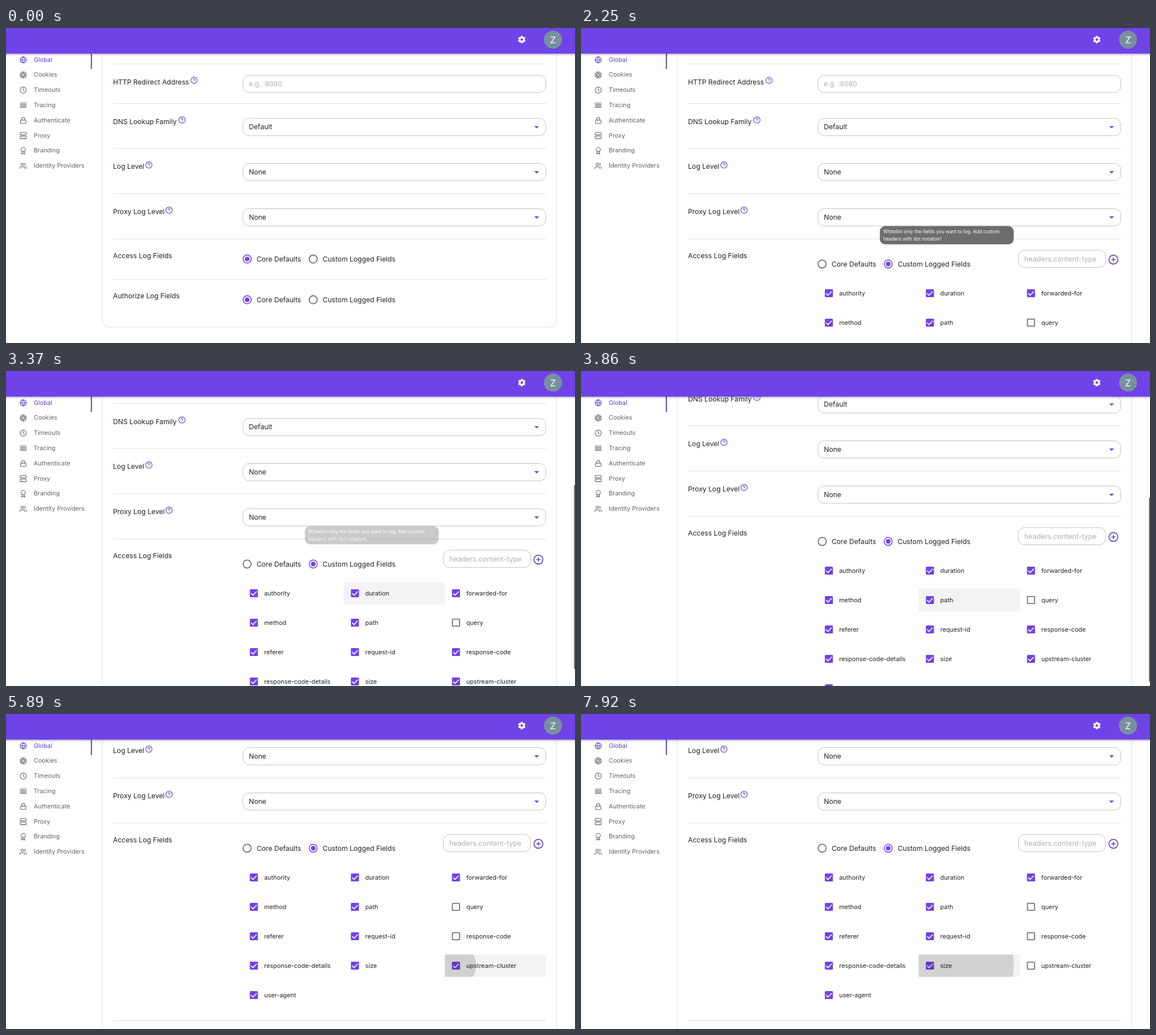
An HTML page for the animation above (7.99 s loop, 1005 by 557 pixels).

```html
<!DOCTYPE html>
<html lang="en">
<head>
<meta charset="utf-8">
<title>Log field settings</title>
<style>
  html, body { margin: 0; width: 100%; height: 100%; overflow: hidden; background: #fff; }
  svg { display: block; width: 100%; height: 100%; font-family: Inter, "Open Sans", sans-serif; }
</style>
</head>
<body>
<svg id="stage" viewBox="0 0 1005 557"></svg>
<script>
const LOOP = 7990, STEP = 70;
const PURPLE = '#6f43e7', INK = '#5e41c0', DARK = '#222', GREY = '#626262';
const stage = document.getElementById('stage');

function el(parent, tag, attrs = {}, content) {
  const node = document.createElementNS('http://www.w3.org/2000/svg', tag);
  for (const k in attrs) node.setAttribute(k, attrs[k]);
  if (content !== undefined) node.textContent = content;
  parent.appendChild(node);
  return node;
}
const group = (parent, attrs) => el(parent, 'g', attrs);
const show = (node, on) => node.setAttribute('visibility', on ? 'inherit' : 'hidden');
const fade = (node, v) => node.setAttribute('opacity', v);

// cy is the middle of the capital letters
function label(parent, x, cy, str, size = 12.15, fill = DARK, extra = {}) {
  return el(parent, 'text', { x, y: cy + size * 0.364, 'font-size': size, fill, ...extra }, str);
}
function box(parent, x, y, width, height, rx, attrs) {
  return el(parent, 'rect', { x, y, width, height, rx, ...attrs });
}

const ring = 'M2 12a10 10 0 1 0 20 0a10 10 0 1 0-20 0';
const icons = {
  globe: ring + 'M2 12h20M12 2a15.3 15.3 0 0 1 4 10 15.3 15.3 0 0 1-4 10 15.3 15.3 0 0 1-4-10 15.3 15.3 0 0 1 4-10z',
  aperture: ring + 'M14.3 8l5.7 9.9M9.7 8h11.5M7.4 12l5.7-9.9M9.7 16L4 6.1M14.3 16H2.8M16.6 12l-5.7 9.9',
  clock: ring + 'M12 6v6l4 2',
  lines: 'M2 5h20M2 9.7h20M2 14.3h20M2 19h20',
  lock: 'M5 11h14a2 2 0 0 1 2 2v7a2 2 0 0 1-2 2H5a2 2 0 0 1-2-2v-7a2 2 0 0 1 2-2zM7 11V7a5 5 0 0 1 10 0v4',
  server: 'M4 2h16a2 2 0 0 1 2 2v4a2 2 0 0 1-2 2H4a2 2 0 0 1-2-2V4a2 2 0 0 1 2-2z' +
    'M4 14h16a2 2 0 0 1 2 2v4a2 2 0 0 1-2 2H4a2 2 0 0 1-2-2v-4a2 2 0 0 1 2-2zM6 6h.01M6 18h.01',
  award: 'M5 8a7 7 0 1 0 14 0a7 7 0 1 0-14 0M8.2 13.9L7 23l5-3 5 3-1.2-9.1',
  users: 'M17 21v-2a4 4 0 0 0-4-4H5a4 4 0 0 0-4 4v2M5 7a4 4 0 1 0 8 0a4 4 0 1 0-8 0M23 21v-2a4 4 0 0 0-3-3.9M16 3.1a4 4 0 0 1 0 7.8',
  help: ring + 'M9.1 9a3 3 0 0 1 5.8 1c0 2-3 3-3 3M12 17h.01',
  plus: ring + 'M12 8v8M8 12h8'
};
function icon(parent, name, cx, cy, scale, stroke) {
  return el(parent, 'path', {
    d: icons[name], transform: `translate(${cx} ${cy}) scale(${scale}) translate(-12 -12)`,
    fill: 'none', stroke, 'stroke-width': 2, 'stroke-linecap': 'round', 'stroke-linejoin': 'round'
  });
}

const page = group(stage);

// settings card
const card = box(page, 170, -40, 802.5, 569, 13, { fill: '#fff', stroke: '#e0e0e0' });
const divider = (parent, y) => box(parent, 189, y - 0.5, 765, 1, 0, { fill: '#e0e0e0' });
[63.5, 133.5, 213, 293, 373].forEach(y => divider(page, y));

function field(x, y, width, parent = page) {
  box(parent, x + 0.5, y + 0.5, width - 1, 30.5, 11, { fill: '#fff', stroke: '#c2c2c2' });
}
function setting(name, cy, helpX, fieldY, value, isSelect = true) {
  label(page, 189, cy, name);
  icon(page, 'help', helpX, cy - 2.8, 0.56, INK);
  field(418, fieldY, 536);
  label(page, 429, fieldY + 15.6, value, 12.15, isSelect ? DARK : '#b0b0b0');
  if (isSelect) el(page, 'path', { d: `M933 ${fieldY + 14}h8.4l-4.2 4.2z`, fill: PURPLE });
}
setting('HTTP Redirect Address', 95.3, 332.2, 83, 'e.g. :8080', false);
setting('DNS Lookup Family', 165.5, 310.8, 159.4, 'Default');
setting('Log Level', 245, 252.4, 239, 'None');
setting('Proxy Log Level', 325, 288, 319, 'None');

function radio(parent, cx, cy, text) {
  const circle = el(parent, 'circle', { cx, cy, r: 7.1, fill: 'none', 'stroke-width': 1.6 });
  const dot = el(parent, 'circle', { cx, cy, fill: PURPLE });
  label(parent, cx + 16.7, cy, text);
  return amount => {
    circle.setAttribute('stroke', amount > 0 ? PURPLE : GREY);
    dot.setAttribute('r', 4.1 * amount);
  };
}
function radioPair(parent, cy) {
  return [radio(parent, 426, cy, 'Core Defaults'), radio(parent, 542.6, cy, 'Custom Logged Fields')];
}

label(page, 189, 402.2, 'Access Log Fields');
const accessRow = group(page);
const [coreRadio, customRadio] = radioPair(accessRow, 408.5);

const authorize = group(page);
divider(authorize, 444.5);
label(authorize, 189, 474, 'Authorize Log Fields');
const [authCore, authCustom] = radioPair(authorize, 480.5);
authCore(1);
authCustom(0);

// custom fields
const custom = group(page);
field(772, 392.4, 155, custom);
label(custom, 783, 408, 'headers.content-type', 12.45, '#b0b0b0');
icon(custom, 'plus', 940.4, 409.5, 0.79, INK);

const names = ['authority', 'duration', 'forwarded-for', 'method', 'path', 'query', 'referer',
  'request-id', 'response-code', 'response-code-details', 'size', 'upstream-cluster', 'user-agent'];
const cells = {};
names.forEach((name, i) => {
  const x = 418 + (i % 3) * 178.5, cy = 469 + Math.floor(i / 3) * 52;
  const hover = box(custom, x, cy - 19.8, 178.7, 39.6, 0, { fill: '#f3f3f3' });
  const cx = x + 19.8;
  const off = box(custom, cx - 6.3, cy - 6.3, 12.6, 12.6, 0.8, { fill: 'none', stroke: GREY, 'stroke-width': 1.6 });
  const on = group(custom);
  box(on, cx - 7.1, cy - 7.1, 14.2, 14.2, 1.6, { fill: PURPLE });
  el(on, 'path', { d: `M${cx - 4.9} ${cy + 0.1}l3.3 3.4 6.6-6.7`, fill: 'none', stroke: '#fff', 'stroke-width': 1.6 });
  label(custom, x + 38, cy, name, 10.9);
  cells[name] = { x, cy, hover, on, off };
});

// start of each hover; each one lasts until the next
const hovers = [[0, ''], [3300, 'duration'], [3580, 'path'], [4350, 'request-id'],
  [4560, 'response-code'], [5470, 'upstream-cluster'], [6450, 'size']];

const HOLD = 170, RIPPLE = 550;
const clicks = [['response-code', 4650], ['upstream-cluster', 5755], ['size', 7120], ['size', 7555]]
  .map(([name, at], i) => {
    const { x, cy } = cells[name];
    const clip = el(stage, 'clipPath', { id: 'clip' + i });
    box(clip, x, cy - 19.8, 178.7, 39.6, 0);
    const holder = group(custom, { 'clip-path': `url(#clip${i})` });
    return { name, at, ripple: el(holder, 'circle', { cx: x + 19, cy: cy - 1 }) };
  });

function tooltip(x, y, height, lines) {
  const tip = group(page);
  box(tip, x, y, 236.5, height, 9.5, { fill: '#616161', 'fill-opacity': 0.92 });
  lines.forEach((line, i) => label(tip, x + 6.2, y + 9.6 + i * 13.1, line, 8.3, '#fff'));
  return tip;
}
const coreTip = tooltip(411, 322.8, 58.3, [
  'Uses the following Defaults from Core Pomerium:',
  'authority, duration, forwarded-for, method, path, referer,',
  'request-id, response-code, response-code-details,',
  'size, upstream-cluster, user-agent']);
const customTip = tooltip(527.8, 350.3, 32.3, [
  'Whitelist only the fields you want to log. Add custom',
  'headers with dot notation!']);

// side navigation
['Global', 'Cookies', 'Timeouts', 'Tracing', 'Authenticate', 'Proxy', 'Branding', 'Identity Providers']
  .forEach((name, i) => {
    const cy = 55.7 + i * 26.8, color = i ? GREY : INK;
    const glyph = ['globe', 'aperture', 'clock', 'lines', 'lock', 'server', 'award', 'users'][i];
    icon(stage, glyph, 30.4, cy + 0.5, 0.54, color);
    label(stage, 49, cy, name, 10.8, color);
  });
box(stage, 149.8, 38, 2, 34.5, 0, { fill: INK });

// app bar
const shade = el(stage, 'linearGradient', { id: 'shade', x2: 0, y2: 1 });
el(shade, 'stop', { offset: 0, 'stop-opacity': 0.2 });
el(shade, 'stop', { offset: 1, 'stop-opacity': 0 });
box(stage, 0, 45.5, 1005, 4.5, 0, { fill: 'url(#shade)' });
box(stage, 0, 0, 1005, 45.5, 0, { fill: PURPLE });
const gear = group(stage, { transform: 'translate(911 20.5)', fill: '#fff' });
[0, 60, 120].forEach(a => box(gear, -1.9, -6.6, 3.8, 13.2, 0.5, { transform: `rotate(${a})` }));
el(gear, 'circle', { r: 4.9 });
el(gear, 'circle', { r: 2.2, fill: PURPLE });
el(stage, 'circle', { cx: 966.2, cy: 20.5, r: 16, fill: '#78909c' });
label(stage, 966.2, 20.6, 'Z', 16.5, '#fff', { 'text-anchor': 'middle' });

const thumb = box(stage, 1003.2, 0, 4, 326, 2, { fill: '#6e6e6e' });

const clamp = v => Math.min(1, Math.max(0, v));

// linear interpolation through [time, value] pairs
function track(t, keys) {
  let [pt, pv] = keys[0];
  for (const [kt, kv] of keys) {
    if (t < kt) return pv + (kv - pv) * clamp((t - pt) / (kt - pt));
    [pt, pv] = [kt, kv];
  }
  return pv;
}

// cubic-bezier(.4, 0, .2, 1)
function ease(p) {
  let lo = 0, hi = 1, u = 0.5;
  for (let i = 0; i < 20; i++) {
    u = (lo + hi) / 2;
    const x = 1.2 * (1 - u) * (1 - u) * u + 0.6 * (1 - u) * u * u + u * u * u;
    if (x < p) lo = u; else hi = u;
  }
  return 3 * (1 - u) * u * u + u * u * u;
}

function render(time) {
  const t = Math.max(0, Math.floor((time - 10) / STEP) * STEP + 10);
  const open = t >= 2110;

  const scroll = track(t, [[3020, 0], [3090, 4], [3160, 23], [3230, 48], [3300, 68], [3370, 76],
    [3720, 76], [3790, 87], [3860, 116], [3930, 150], [4000, 172], [4070, 180]]);
  page.setAttribute('transform', `translate(0 ${-scroll})`);
  thumb.setAttribute('y', 159 + scroll * 0.556);
  fade(thumb, t < 3090 ? 0 : track(t, [[4630, 1], [4910, 0]]));

  card.setAttribute('height', open ? 847 : 569);
  accessRow.setAttribute('transform', `translate(0 ${open ? 8.8 : 0})`);
  authorize.setAttribute('transform', `translate(0 ${open ? 278 : 0})`);
  show(custom, open);
  const picked = track(t, [[2040, 0], [2250, 1]]);
  coreRadio(1 - picked);
  customRadio(picked);

  fade(coreTip, track(t, [[430, 0], [500, 0.35], [570, 0.8], [640, 1], [1760, 1], [1830, 0.7], [1970, 0]]));
  fade(customTip, track(t, [[1830, 0], [1900, 0.5], [1970, 1], [3230, 1], [3300, 0.8], [3370, 0.36], [3440, 0]]));

  const hovered = hovers.filter(h => t >= h[0]).pop()[1];
  const checked = {};
  for (const name of names) checked[name] = name !== 'query';

  for (const { name, at, ripple } of clicks) {
    const age = t - at;
    if (age >= HOLD) checked[name] = !checked[name];
    const grow = ease(clamp(age / RIPPLE));
    const gone = ease(clamp((age - HOLD) / RIPPLE));
    ripple.setAttribute('r', age > 0 ? 162 * grow : 0);
    fade(ripple, (0.1 + 0.2 * grow) * (1 - gone));
  }
  for (const name of names) {
    const cell = cells[name];
    show(cell.hover, name === hovered);
    show(cell.on, checked[name]);
    show(cell.off, !checked[name]);
  }
}

const start = performance.now();
function tick() {
  render((performance.now() - start) % LOOP);
  requestAnimationFrame(tick);
}
tick();
</script>
</body>
</html>
```
